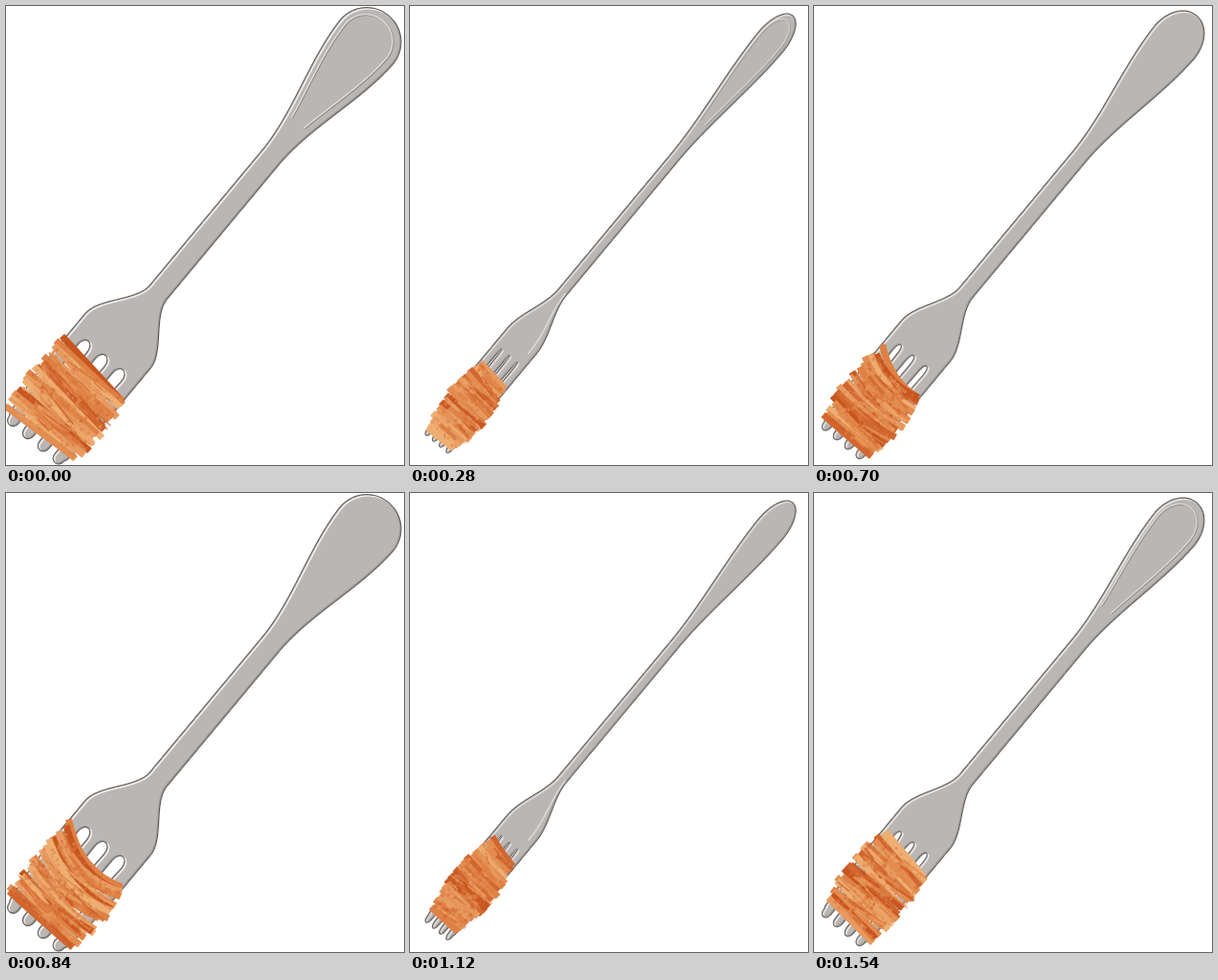
Recreate the animation shown at these times as an HTML page with a canvas. Size 416 by 480 pixels, loop 1680 ms.

```html
<!DOCTYPE html>
<html lang="en">
<head>
<meta charset="utf-8">
<title>Twirling fork</title>
<style>
  html, body { margin: 0; width: 100%; height: 100%; overflow: hidden; background: #fff; }
  canvas { display: block; width: 416px; height: 480px; }
</style>
</head>
<body>
<canvas id="stage" width="416" height="480"></canvas>
<script>
const ctx = document.getElementById('stage').getContext('2d');
const STEP = 140, STEPS = 12;
const CAP = 543, CAP_RADIUS = 36, INSET = 8;
const sauce = ['#e89a60', '#df8144', '#d2662f', '#eeae72', '#e38d50', '#c8561f'];

const mix = (a, b, t) => a + (b - a) * t;

function smooth(from, to, s) {
  const t = Math.min(1, Math.max(0, (s - from) / (to - from)));
  return t * t * (3 - 2 * t);
}

function random(seed) {
  let n = seed * 7919 + 17;
  return () => (n = (n * 16807) % 2147483647) / 2147483647;
}

// Half width of the fork at distance s from the tips, less an optional margin
function halfWidth(s, margin = 0) {
  if (s > CAP) return Math.sqrt(Math.max(0, (CAP_RADIUS - margin) ** 2 - (s - CAP) ** 2));
  const head = 33 * smooth(203, 136, s) - 7 * Math.max(0, 1 - s / 90) ** 2;
  const handle = 24.5 * smooth(385, 548, s);
  return 11.6 + head + handle - margin;
}

// Up the left side, over the end and back down the right side
function outline(path, start, k, margin) {
  const end = CAP + CAP_RADIUS - margin;
  for (let s = start; s <= end; s++) path.lineTo(s, -k * halfWidth(s, margin));
  for (let s = end; s >= start; s--) path.lineTo(s, k * halfWidth(s, margin));
}

function forkPath(k) {
  const path = new Path2D();
  outline(path, 6, k, 0);
  const gap = 6.3 * k ** 2.5, tip = 6.3 * k;
  for (let i = 3; i >= 0; i--) {
    const c = 20.6 * (i - 1.5) * k;
    path.lineTo(4, c + tip);
    path.bezierCurveTo(-6, c + tip, -6, c - tip, 4, c - tip);
    if (i) {
      const g = 23.5 * (i - 2) * k;
      path.lineTo(106, g + gap);
      path.bezierCurveTo(120, g + gap, 120, g - gap, 106, g - gap);
    }
  }
  path.closePath();
  return path;
}

function stroke(path, color, width, shift = 0) {
  ctx.save();
  ctx.translate(0, shift);
  ctx.strokeStyle = color;
  ctx.lineWidth = width;
  ctx.stroke(path);
  ctx.restore();
}

function drawFork(angle, k) {
  const body = forkPath(k);
  ctx.fillStyle = '#bab6b3';
  ctx.fill(body);

  ctx.save();
  ctx.clip(body);
  ctx.globalAlpha = mix(.3, 1, k);
  stroke(body, '#98938f', 1.2, -1.2);
  stroke(body, '#f2f1f0', 1.5, 2.1);
  if (Math.cos(angle) > .1) {
    const loop = new Path2D();
    outline(loop, 432, k, INSET);
    stroke(loop, '#8b8783', 1.1);
    stroke(loop, '#e9e7e5', 1.1, -1.3);
  }
  if (Math.sin(2 * angle) > .1) {
    const edge = new Path2D();
    for (let s = 130; s < 205; s++) edge.lineTo(s, halfWidth(s) * k * .66);
    stroke(edge, '#f2f1f0', 1.5);
  }
  ctx.restore();
  stroke(body, '#62605e', 1.1);
}

function drawPasta(step, angle, k) {
  const rnd = random(step + 3);
  const spread = amount => (rnd() - .5) * amount;
  const open = smooth(.4, 1, k);
  const top = 99 - 9 * Math.sin(angle), bottom = 5 - 4 * Math.sin(angle) + 4 * open;
  const sag = 15 * Math.max(0, -Math.cos(angle)) ** 4;
  const wide = 6 + 44 * k, ends = wide * mix(.7, .93, open);
  const widthAt = t => mix(ends, wide, Math.sin(t * Math.PI));

  // t runs from the top edge (0) to the bottom (1), x across from -1 to 1
  const rowAt = (t, x) => mix(top, bottom, t) - 4 * x * (1 - t)
    + sag * (1 - t) * (x * x - .6 - .3 * x);

  function strand(t, size, from, to, tilt) {
    const w = widthAt(t);
    ctx.beginPath();
    for (let i = 0; i <= 8; i++) {
      const x = mix(from, to, i / 8);
      ctx.lineTo(rowAt(t, x) - tilt * x, x * w);
    }
    ctx.lineWidth = size;
    ctx.strokeStyle = sauce[Math.floor(rnd() * sauce.length)];
    ctx.stroke();
  }

  const rows = 19;
  for (let i = 0; i < rows; i++) {
    strand((i + .5) / rows, 7, -.98 + spread(.16), .98 + spread(.16), spread(3 + 6 * open));
  }
  for (let i = 0; i < 60; i++) {
    const from = -1 + rnd() * 1.2;
    ctx.globalAlpha = .35 + rnd() * .4;
    strand(.06 + rnd() * .88, 1.2 + rnd() * 3, from, Math.min(1.02, from + .3 + rnd()),
      spread(8 + 10 * open));
  }
  for (let i = 0; i < wide * 9; i++) {
    const t = .04 + rnd() * .92, x = spread(1.84);
    ctx.globalAlpha = .2 + rnd() * .25;
    ctx.fillStyle = sauce[Math.floor(rnd() * sauce.length)];
    ctx.beginPath();
    ctx.arc(rowAt(t, x), x * widthAt(t), .6 + rnd() * 1.5, 0, 7);
    ctx.fill();
  }
  ctx.globalAlpha = 1;
}

function draw(step) {
  const angle = step / STEPS * 2 * Math.PI;
  // Apparent width: full face on, never thinner than the metal
  const k = mix(.42, 1, Math.cos(angle) ** 4);
  ctx.setTransform(1, 0, 0, 1, 0, 0);
  ctx.clearRect(0, 0, 416, 480);
  // x runs up the fork's axis, y across it
  ctx.setTransform(.6395, -.7688, .7688, .6395, 29.7, 455.1);
  drawFork(angle, k);
  drawPasta(step, angle, k);
}

let shown = -1;
function tick() {
  const step = Math.floor(performance.now() / STEP) % STEPS;
  if (step !== shown) draw(shown = step);
  requestAnimationFrame(tick);
}
tick();
</script>
</body>
</html>
```
